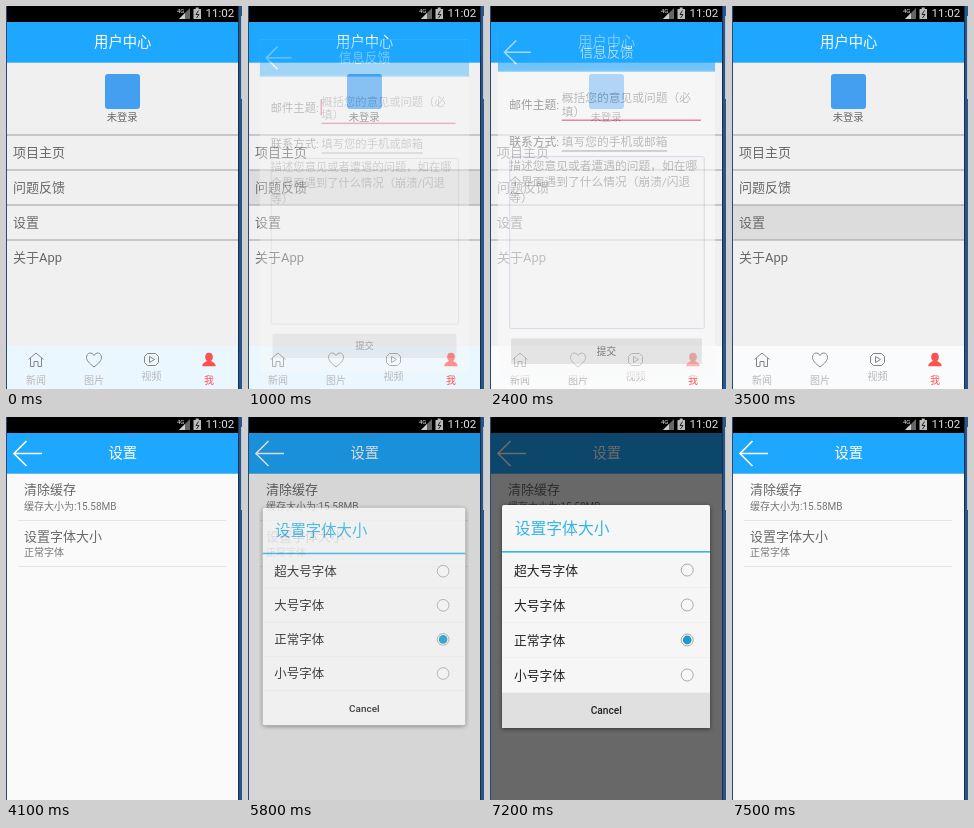
These frames come from a looping animation (236 by 383 pixels, 8 s). An HTML page:

```html
<!DOCTYPE html>
<html lang="zh-CN">
<head>
<meta charset="utf-8">
<style>
html, body { margin: 0; width: 100%; height: 100%; overflow: hidden; background: #fafafa; }
svg { display: block; }
text { font-family: Roboto, "Noto Sans CJK SC", "Noto Sans CJK", sans-serif; }
#dialog { font-weight: 500; filter: drop-shadow(0 1px 2px rgba(0, 0, 0, .5)); }
#dialog .title { font-weight: 400; }
</style>
</head>
<body>
<svg id="stage" width="236" height="383" viewBox="0 0 236 383"></svg>
<script>
const rect = (x, y, w, h, fill, extra = '') =>
  `<rect x="${x}" y="${y}" width="${w}" height="${h}" fill="${fill}" ${extra}/>`;
// y is the vertical middle of the glyphs
const text = (s, x, y, size, fill, anchor = 'start') =>
  `<text x="${x}" y="${y + size * .38}" font-size="${size}" fill="${fill}" text-anchor="${anchor}">${s}</text>`;
const stroke = (d, color, width = 1) =>
  `<path d="${d}" fill="none" stroke="${color}" stroke-width="${width}"/>`;
const group = (id, content) => `<g id="${id}">${content}</g>`;

const GREY = '#686868', HINT = '#999', ICON = '#858585', BLUE = '#1ea7ff', CYAN = '#33b5e5', RED = '#fb5450';

const header = (title, back) => rect(1, 16, 231, 41, BLUE) + rect(1, 56, 231, 1, '#62bdf5') +
  text(title, 116.7, 35.7, 14.3, '#fff', 'middle') +
  (back ? stroke('M36 36.5H8M20.5 24L8 36.5L20.5 49', '#fff', 1.6) : '');

const page = (title, content) => rect(1, 16, 231, 367, '#fafafa') + header(title, true) + content;

function home() {
  const rows = ['项目主页', '问题反馈', '设置', '关于App'].map((label, i) =>
    rect(1, 128.5 + 35 * i, 231, 1, '#a0a0a0') + text(label, 7, 146.2 + 35 * i, 13, GREY)).join('');
  const tabs = [['新闻', 30, 374], ['图片', 88, 374], ['视频', 145.5, 370], ['我', 203, 374]].map(([label, x, y]) =>
    text(label, x, y, 10, label === '我' ? RED : '#b8b8b8', 'middle')).join('');
  const icons =
    stroke('M22.5 353.5L30 347L37.5 353.5M24.5 352V360.5H28V355.5H32V360.5H35.5V352', ICON) +
    stroke('M88 361C83 357 80.5 354.5 80.5 351.5C80.5 346.5 86 345.5 88 349.5C90 345.5 95.5 346.5 95.5 351.5C95.5 354.5 93 357 88 361Z', ICON) +
    stroke('M141.5 347.5H149.5L152.5 350.5V356.5L149.5 359.5H141.5L138.5 356.5V350.5ZM143.5 350.5V356.5L148.5 353.5Z', ICON) +
    `<ellipse cx="203" cy="351" rx="3.8" ry="4.3" fill="${RED}"/>` +
    `<path d="M196.3 360.3C196.3 356.5 200 356 201.5 354.5H204.5C206 356 209.7 356.5 209.7 360.3Z" fill="${RED}"/>`;
  return rect(1, 16, 231, 367, '#f0f0f0') + rect(1, 0, 231, 35, '#dcdcdc', 'id="pressedRow"') +
    header('用户中心') + rect(99, 68, 35, 35, '#459ff0', 'rx="3"') +
    text('未登录', 116.2, 110.6, 10.3, GREY, 'middle') + rows +
    rect(1, 340, 231, 43, '#ebf7fe', 'id="tabBar"') + icons + tabs;
}

function feedback() {
  const hints = [['概括您的意见或问题（必', 69, 85], ['填）', 69, 99.5], ['填写您的手机或邮箱', 69, 131.5],
    ['描述您意见或者遭遇的问题，如在哪', 13, 156.5], ['个界面遇到了什么情况（崩溃/闪退', 13, 174], ['等）', 13, 191.5]];
  return page('信息反馈',
    text('邮件主题:', 13, 92, 12.5, GREY) + text('联系方式:', 13, 131.5, 12.5, GREY) +
    rect(13.5, 147.5, 207, 183, '#f8f8f8', 'rx="2" stroke="#c3cae0"') +
    hints.map(([s, x, y]) => text(s, x, y, 12.5, HINT)).join('') +
    rect(68, 82, 1.6, 18, '#e0407e', 'id="cursor"') +
    rect(69, 108, 148, 1.6, '#e0407e') + rect(69, 141, 112, 1, '#777') +
    rect(15, 341, 203, 27, '#d6d6d6', 'rx="1"') + text('提交', 116.5, 354.5, 10.3, '#222', 'middle'));
}

const settings = () => page('设置',
  text('清除缓存', 18, 72.3, 13, GREY) + text('缓存大小为:15.58MB', 18, 89, 10, '#777') +
  rect(12, 103, 208, 1, '#e4e4e4') +
  text('设置字体大小', 18, 119, 13, GREY) + text('正常字体', 18, 135.5, 10, '#777') +
  rect(12, 149, 208, 1, '#e4e4e4'));

function dialog() {
  const options = ['超大号字体', '大号字体', '正常字体', '小号字体'].map((label, i) => {
    const y = 153 + 35 * i;
    return text(label, 24, y, 12.8, '#222') + rect(12, y + 17, 208, 1, '#efefef') +
      `<circle cx="197.2" cy="${y}" r="6" fill="#f8f8f8" stroke="#aaa"/>` +
      (i === 2 ? `<circle cx="197.2" cy="${y}" r="4.4" fill="#1e9bd0"/>` : '');
  }).join('');
  return rect(12, 88, 208, 223, '#f6f6f6', 'rx="2"') +
    `<g class="title">${text('设置字体大小', 24.7, 111, 15.8, CYAN)}</g>` +
    rect(12, 134, 208, 1.6, CYAN) + options +
    rect(12, 276, 208, 35, '#e0e0e0', 'id="pressedCancel"') +
    text('Cancel', 116.3, 293.5, 10.2, '#222', 'middle');
}

const statusBar = rect(0, 0, 233, 16, '#000') +
  text('4G', 171, 4.5, 6, '#eee') +
  '<path d="M173 13L184 2V13Z" fill="#666"/><path d="M173 13L179 7V13Z" fill="#ccc"/>' +
  rect(187.5, 3, 7.5, 10, '#bbb') + rect(189.7, 1.5, 3, 2, '#bbb') +
  stroke('M192.5 4.5L190 8.5H193L190.5 12', '#222') +
  text('11:02', 199.5, 6.9, 11.6, '#ddd');

const frame = rect(0, 0, 1, 383, '#234a78') + rect(232, 0, 1, 383, '#16304f') +
  rect(233, 0, 3, 383, '#2a5588') + rect(235, 10, 1, 83, '#b9c6d6');

document.getElementById('stage').innerHTML =
  group('home', home()) + group('feedback', feedback()) + group('settings', settings()) +
  rect(1, 16, 231, 367, '#000', 'id="dim"') + group('dialog', dialog()) + statusBar + frame;

const el = id => document.getElementById(id);
const ramp = (t, start, length) => Math.min(1, Math.max(0, (t - start) / length));
const easeOut = u => 1 - (1 - u) ** 3;
const between = (t, a, b) => t >= a && t < b;
const show = (id, on) => el(id).setAttribute('visibility', on ? 'inherit' : 'hidden');

// Windows fade while zooming between 85% and full size
function setWindow(id, amount) {
  el(id).setAttribute('opacity', amount);
  el(id).setAttribute('transform', `translate(116.25 199.5) scale(${.85 + .15 * amount}) translate(-116.25 -199.5)`);
}

function render(now) {
  const t = Math.floor(now % 8000 / 100) * 100; // screen refreshes ten times a second

  show('pressedRow', between(t, 600, 2300) || t >= 3500);
  el('pressedRow').setAttribute('y', t < 2300 ? 164 : 199);
  el('tabBar').setAttribute('fill', t < 1300 ? '#ebf7fe' : '#fafbfc');

  setWindow('feedback', easeOut(ramp(t, 950, 350)) - ramp(t, 2200, 500));
  show('cursor', t < 1800);
  setWindow('settings', easeOut(ramp(t, 3850, 250)));

  const closing = ramp(t, 7200, 300);
  setWindow('dialog', easeOut(ramp(t, 5700, 225)) * (t < 5800 ? 0 : 1 - closing));
  el('dim').setAttribute('opacity', .58 * ramp(t, 5750, 200) * (1 - closing));
  show('pressedCancel', t >= 7200);

  requestAnimationFrame(render);
}
requestAnimationFrame(render);
</script>
</body>
</html>
```
